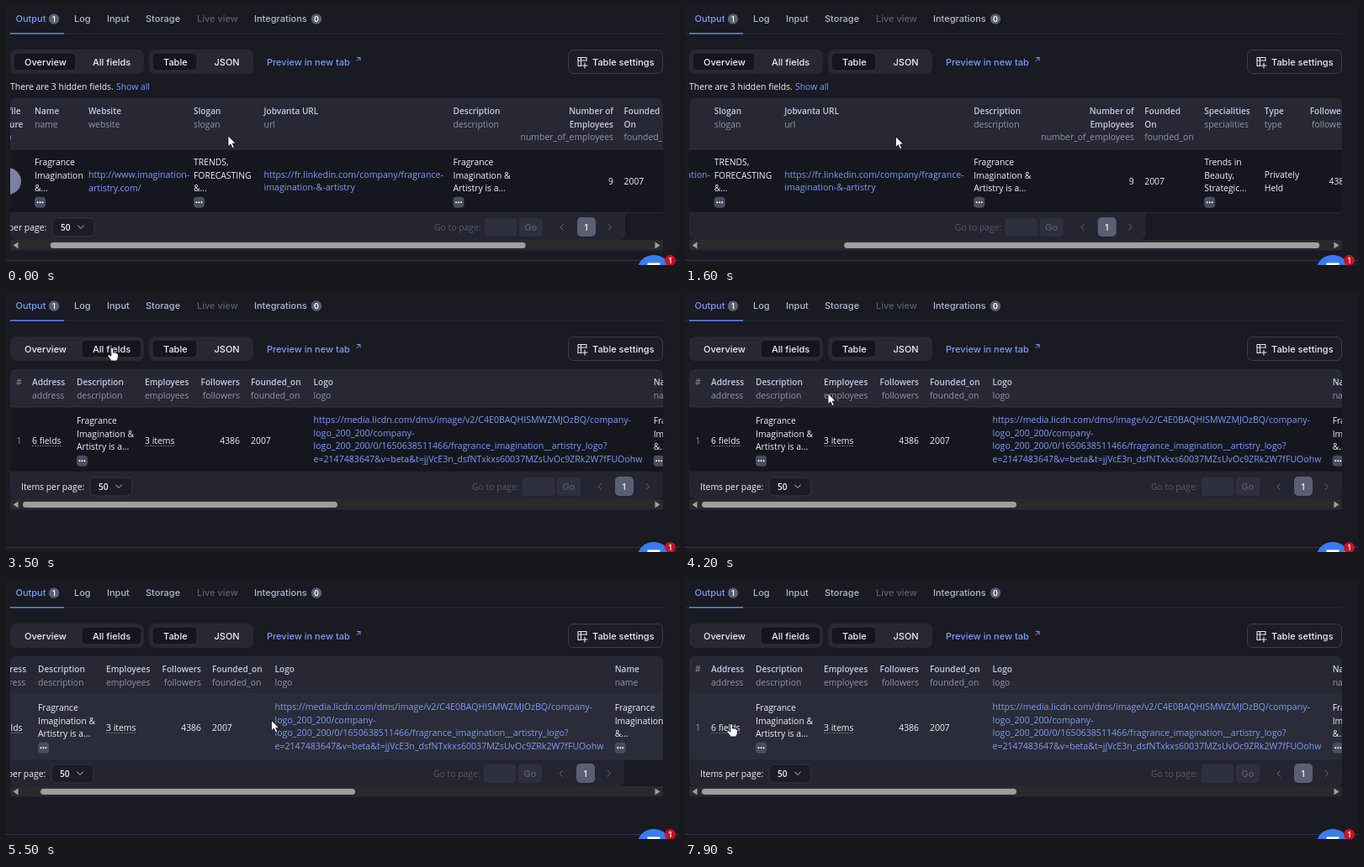
An HTML page that plays this animation: 800 by 309 pixels, repeating every 8 s.

```html
<!DOCTYPE html>
<html lang="en">
<head>
<meta charset="utf-8">
<title>Dataset table</title>
<style>
  html, body { margin: 0; width: 100%; height: 100%; overflow: hidden; background: #191a22; }
  svg { display: block; width: 800px; height: 309px; }
  text { font: 400 10.4px "Open Sans", "Noto Sans", sans-serif; fill: #f0f1f8; white-space: pre; }
  .ui { font: 500 11px Inter, sans-serif; fill: #eceef8; }
  .tab { font: 500 11px Inter, sans-serif; fill: #b3b8d0; }
  .off { font: 500 11px Inter, sans-serif; fill: #5a5d70; }
  .link { font: 500 11px Inter, sans-serif; fill: #7d9bf7; }
  .num { font: 600 9px Inter, sans-serif; fill: #fff; }
  .bold { font-weight: 600; font-size: 10.2px; }
  .head { font-weight: 600; font-size: 10.1px; fill: #c3c9e4; }
  .sub { fill: #8f94ae; }
  .url { font-size: 10.6px; fill: #7d9bf7; }
  .note { fill: #7d9bf7; }
  .dim { fill: #55586b; font-weight: 500; }
  .code { font: 500 9.75px "Noto Sans Mono", "DejaVu Sans Mono", monospace; fill: #b5bad2; }
  .code tspan { fill: #95c96c; }
</style>
</head>
<body>
<svg id="stage" viewBox="0 0 800 309"></svg>
<script>
const LOOP = 8000, STEP = 100;
const SWITCH = 3500;              // "All fields" is clicked
const POPUP = [6500, 7500];

const esc = s => s.replace(/&/g, '&amp;');
// y is the optical middle of the line
const text = (x, y, s, cls = '', anchor = 'start') =>
  `<text x="${x}" y="${y + 4}" class="${cls}" text-anchor="${anchor}">${esc(s)}</text>`;
const lines = (x, y, list, cls, anchor) =>
  list.map((s, i) => text(x, y + i * 15.7, s, cls, anchor)).join('');
const rect = (x, y, w, h, fill, r = 0, stroke = 'none') =>
  `<rect x="${x}" y="${y}" width="${w}" height="${h}" rx="${r}" fill="${fill}" stroke="${stroke}"/>`;
const path = (d, stroke, fill = 'none', w = 1.2) =>
  `<path d="${d}" stroke="${stroke}" fill="${fill}" stroke-width="${w}" stroke-linejoin="round" stroke-linecap="round"/>`;
const disc = (x, y, r, fill) => `<circle cx="${x}" cy="${y}" r="${r}" fill="${fill}"/>`;
// Scrollbar arrow head centred on x, y
const arrowHead = (x, y, turn) =>
  `<path d="M-3-4V4L3 0Z" fill="#a0a0a0" transform="translate(${x} ${y}) rotate(${turn})"/>`;

// Column heading: last line is the muted field name
function heading(x, y, list, anchor) {
  const n = list.length - 1;
  return lines(x, y, list.slice(0, n), 'head', anchor) +
    text(x, y + n * 15.7, list[n], 'sub', anchor);
}
function more(x, y) {
  return rect(x, y - 6.5, 13, 13, '#4a4d60', 4) +
    [3.5, 6.5, 9.5].map(d => disc(x + d, y, 1, '#fff')).join('');
}
const cell = (x, y, list) => lines(x, y, list) + more(x, y + 48.3);
const count = (x, n) => disc(x, 15.5, 6.2, '#5b5f74') + text(x, 14.8, n, 'num', 'middle');

function footer(y) {
  const m = y + 17;
  return path(`M5 ${y}H781V${y + 24}q0 8-8 8H13q-8 0-8-8Z`, 'none', '#242530') +
    text(18, m, 'Items per page:') +
    rect(100, m - 11, 50, 22, '#1b1c25', 6, '#343644') + text(110, m, '50', 'bold') +
    path(`M130.5 ${m - 2}l3.5 3.5 3.5-3.5`, '#c3c9e4', 'none', 1) +
    text(554, m, 'Go to page:', 'dim') +
    rect(614, m - 11, 38, 22, '#2f303d', 4) +
    rect(655, m - 11, 28, 22, '#2f303d', 4) + text(669, m, 'Go', 'off', 'middle') +
    path(`M707.5 ${m - 3.5}l-3.5 3.5 3.5 3.5`, '#62667c', 'none', 1) +
    rect(724, m - 12, 22, 23, '#5b5f74', 5) + text(735, m, '1', 'bold', 'middle') +
    path(`M761 ${m - 3.5}l3.5 3.5-3.5 3.5`, '#62667c', 'none', 1);
}

function scrollbar(y, id, w) {
  const m = y + 6.5;
  return rect(5, y, 776, 12.5, '#2a2a2d') +
    arrowHead(11.5, m, 180) + arrowHead(774.5, m, 0) +
    `<rect id="${id}" x="20" y="${m - 3.5}" width="${w}" height="7" rx="3.5" fill="#9f9f9f"/>`;
}

function table(id, top, row, foot, width, body) {
  return `<clipPath id="${id}Clip"><rect x="5" y="${top}" width="776" height="${foot + 32 - top}" rx="7"/></clipPath>
    <g clip-path="url(#${id}Clip)"><g id="${id}Body">` +
    rect(5, top, width, row - top, '#272833') +
    `<rect id="${id}Row" x="5" y="${row}" width="${width}" height="${foot - row}" fill="#16171e"/>` +
    path(`M5 ${row}h${width}M5 ${foot}h${width}`, '#30313d', 'none', 1) +
    body + footer(foot) + '</g></g>';
}

const nameCell = ['Fragrance', 'Imagination', '&...'];
const aboutCell = ['Fragrance', 'Imagination &', 'Artistry is a...'];

const overview =
  text(5, 96, 'There are 3 hidden fields.') + text(131, 96, 'Show all', 'note') +
  table('over', 110, 171, 247, 1032,
    text(12, 125, '#', 'sub') +
    heading(31, 125, ['Profile', 'Picture', 'logo']) +
    heading(79, 125, ['Name', 'name']) +
    heading(143, 125, ['Website', 'website']) +
    heading(268, 125, ['Slogan', 'slogan']) +
    heading(351.5, 125, ['Jobvanta URL', 'url']) +
    heading(576.5, 125, ['Description', 'description']) +
    heading(767, 125, ['Number of', 'Employees', 'number_of_employees'], 'end') +
    heading(779.5, 125, ['Founded', 'On', 'founded_on']) +
    heading(850.5, 125, ['Specialities', 'specialities']) +
    heading(922, 125, ['Type', 'type']) +
    heading(1022.5, 125, ['Followers', 'followers'], 'end') +
    text(12.5, 209, '1', 'sub') +
    disc(47, 209, 16, '#7f7fa6') +
    cell(79, 186, nameCell) +
    lines(143, 201, ['http://www.imagination-', 'artistry.com/'], 'url') +
    cell(268, 186, ['TRENDS,', 'FORECASTING', '&...']) +
    lines(351.5, 200.5, ['https://fr.linkedin.com/company/fragrance-', 'imagination-&-artistry'], 'url') +
    cell(576.5, 186, aboutCell) +
    text(767, 209, '9', '', 'end') +
    text(779.5, 209, '2007') +
    cell(850.5, 186, ['Trends in', 'Beauty,', 'Strategic...']) +
    lines(922, 201, ['Privately', 'Held']) +
    text(1022.5, 209, '4386', '', 'end')) +
  scrollbar(279, 'overThumb', 565);

const dashes = (x, w) =>
  `<path d="M${x} 182.5h${w}" stroke="#63677e" stroke-dasharray="2 1"/>`;

const allFields =
  table('all', 90.5, 136, 214, 1550,
    text(12, 106, '#', 'sub') +
    heading(31, 106, ['Address', 'address']) +
    heading(84, 106, ['Description', 'description']) +
    heading(165, 106, ['Employees', 'employees']) +
    heading(278, 106, ['Followers', 'followers'], 'end') +
    heading(291, 106, ['Founded_on', 'founded_on']) +
    heading(365.5, 106, ['Logo', 'logo']) +
    heading(769.7, 106, ['Name', 'name']) +
    text(12.5, 176, '1', 'sub') +
    text(31, 176, '6 fields') + dashes(31, 35) +
    cell(84, 152, aboutCell) +
    text(165, 176, '3 items') + dashes(165, 35) +
    text(278, 176, '4386', '', 'end') +
    text(291, 176, '2007') +
    lines(365.5, 151, [
      'https://media.licdn.com/dms/image/v2/C4E0BAQHISMWZMJOzBQ/company-',
      'logo_200_200/company-',
      'logo_200_200/0/1650638511466/fragrance_imagination__artistry_logo?',
      'e=2147483647&v=beta&t=jjVcE3n_dsfNTxkxs60037MZsUvOc9ZRk2W7fFUOohw'], 'url') +
    cell(769.7, 152, nameCell)) +
  scrollbar(246, 'allThumb', 374);

const codeLine = ([key, value], i) =>
  `<text class="code" x="-3" y="${22.7 + i * 15.8}">${key}<tspan>${value}</tspan></text>`;

const popup =
  rect(-10, -10, 202.5, 169, '#272833', 4) +
  rect(-10, -10, 190, 155.5, '#20212b', 7, '#2f303c') +
  rect(167, 0, 12.5, 121, '#25262f') + rect(0, 121, 167, 12.5, '#25262f') +
  arrowHead(173.5, 1.5, -90) + arrowHead(173.5, 115, 90) + arrowHead(161.5, 127, 0) +
  [['', 'PostalAddress",'],
   ['dress": ', '"8 rue Valombrel",'],
   ['ocality": ', '"Lomys",'],
   ['egion": ', '"Val de Soreil",'],
   ['de": ', '"99417",'],
   ['ountry": ', '"FR"']].map(codeLine).join('');

const chrome =
  path('M0 33h781', '#2b2c38', 'none', 1) + rect(5, 32, 64, 1.5, '#5c85f0') +
  text(11.5, 15, 'Output', 'link') + count(57, '1') +
  text(81, 15, 'Log', 'tab') + text(120, 15, 'Input', 'tab') +
  text(166, 15, 'Storage', 'tab') + text(227, 15, 'Live view', 'off') +
  text(295, 15, 'Integrations', 'tab') + count(369, '0') +
  rect(5, 52, 159, 29, '#272833', 7) +
  '<rect id="pick" y="56" height="21" rx="5" fill="#15161d" stroke="#30323e"/>' +
  text(22, 66.5, 'Overview', 'ui') + text(103, 66.5, 'All fields', 'ui') +
  rect(170, 52, 124, 29, '#272833', 7) +
  rect(174, 56, 53, 21, '#15161d', 5, '#30323e') +
  text(187, 66.5, 'Table', 'ui') + text(247.5, 66.5, 'JSON', 'ui') +
  text(310, 66.5, 'Preview in new tab', 'link') +
  path('M417 65.5l4-4M417.5 61.5h3.5v3.5', '#7d9bf7', 'none', 1) +
  rect(668.5, 52.5, 112, 28, '#1c1d26', 6, '#3c3e4c') +
  path('M684 71.5h-4V61.5h10v4M680 65h10M683.5 61.5v10M688 68v6M685 71h6', '#e6e8f4', 'none', 1.1) +
  text(697, 66.5, 'Table settings', 'ui') +
  path('M0 303.5h800', '#343540', 'none', 1);

const launcher =
  disc(770, 317, 20, '#3b7bf0') + rect(762.5, 306.5, 15, 15, '#fff') +
  disc(789.5, 303.5, 6.5, '#cc1026') + text(789.5, 303, '1', 'num', 'middle');

const cursors =
  '<g id="arrow">' + path('M0 0V12.5L3 9.8 5.2 14.6 7.3 13.6 5.2 9H9Z', '#111', '#fff', .8) + '</g>' +
  '<g id="hand">' + path('M-1.3 1.2q0-1.7 1.4-1.7T1.5 1.2V5q3 0 4.2.8 1.8.6 1.8 2.6 0 4-2 6.6H-.8' +
    'Q-2.5 12-5 9.3q-.3-1.6 1.4-1.5L-1.3 9Z', '#111', '#fff', .8) + '</g>';

document.getElementById('stage').innerHTML = chrome +
  `<g id="over">${overview}</g><g id="all">${allFields}</g>` +
  launcher + `<g id="popup">${popup}</g>` + cursors;

// Tracks: [time, value...]
const overScroll = [[0, 45], [800, 222], [1150, 257], [1450, 257], [2250, 0]];
const allScroll = [[4600, 0], [5400, 46], [5600, 46], [6200, 0]];
const pointer = [[0, 264, 155], [1300, 264, 155], [1900, 237, 157], [2600, 237, 157],
  [3300, 126, 66], [3600, 126, 66], [4200, 170, 120], [4500, 172, 122], [5200, 315.5, 167.5],
  [5600, 315.5, 167.5], [6400, 38, 174], [6700, 34, 173], [7300, 36, 174], [7900, 55, 172]];

function at(track, t) {
  const i = track.findIndex(k => k[0] > t);
  if (i < 0) return track[track.length - 1].slice(1);
  if (i === 0) return track[0].slice(1);
  const a = track[i - 1], b = track[i];
  const u = (t - a[0]) / (b[0] - a[0]), e = u * u * (3 - 2 * u);
  return a.slice(1).map((v, j) => v + (b[j + 1] - v) * e);
}

const $ = id => document.getElementById(id);
const show = (id, on) => $(id).setAttribute('display', on ? 'inline' : 'none');
const move = (id, x, y = 0) => $(id).setAttribute('transform', `translate(${x} ${y})`);
const inside = (x, y, l, t, r, b) => x >= l && x <= r && y >= t && y <= b;

function draw(t) {
  const all = t >= SWITCH;
  const [so] = at(overScroll, t), [sa] = at(allScroll, t), [x, y] = at(pointer, t);
  show('over', !all);
  show('all', all);
  show('popup', t >= POPUP[0] && t < POPUP[1]);
  move('overBody', -so);
  move('overThumb', so * .725);
  move('allBody', -sa);
  move('allThumb', sa * .457);
  $('pick').setAttribute('x', all ? 90 : 9);
  $('pick').setAttribute('width', all ? 71 : 74);
  $('allRow').setAttribute('fill', inside(x, y, 5, 136, 781, 214) ? '#2b2c39' : '#16171e');
  const hand = inside(x, y, 90, 56, 161, 77) || (all && inside(x, y, 28, 166, 68, 186));
  show('hand', hand);
  show('arrow', !hand);
  move('hand', x, y);
  move('arrow', x, y);
}

const start = performance.now();
function tick() {
  const t = (performance.now() - start) % LOOP;
  draw(Math.floor(t / STEP) * STEP);
  requestAnimationFrame(tick);
}
tick();
</script>
</body>
</html>
```
